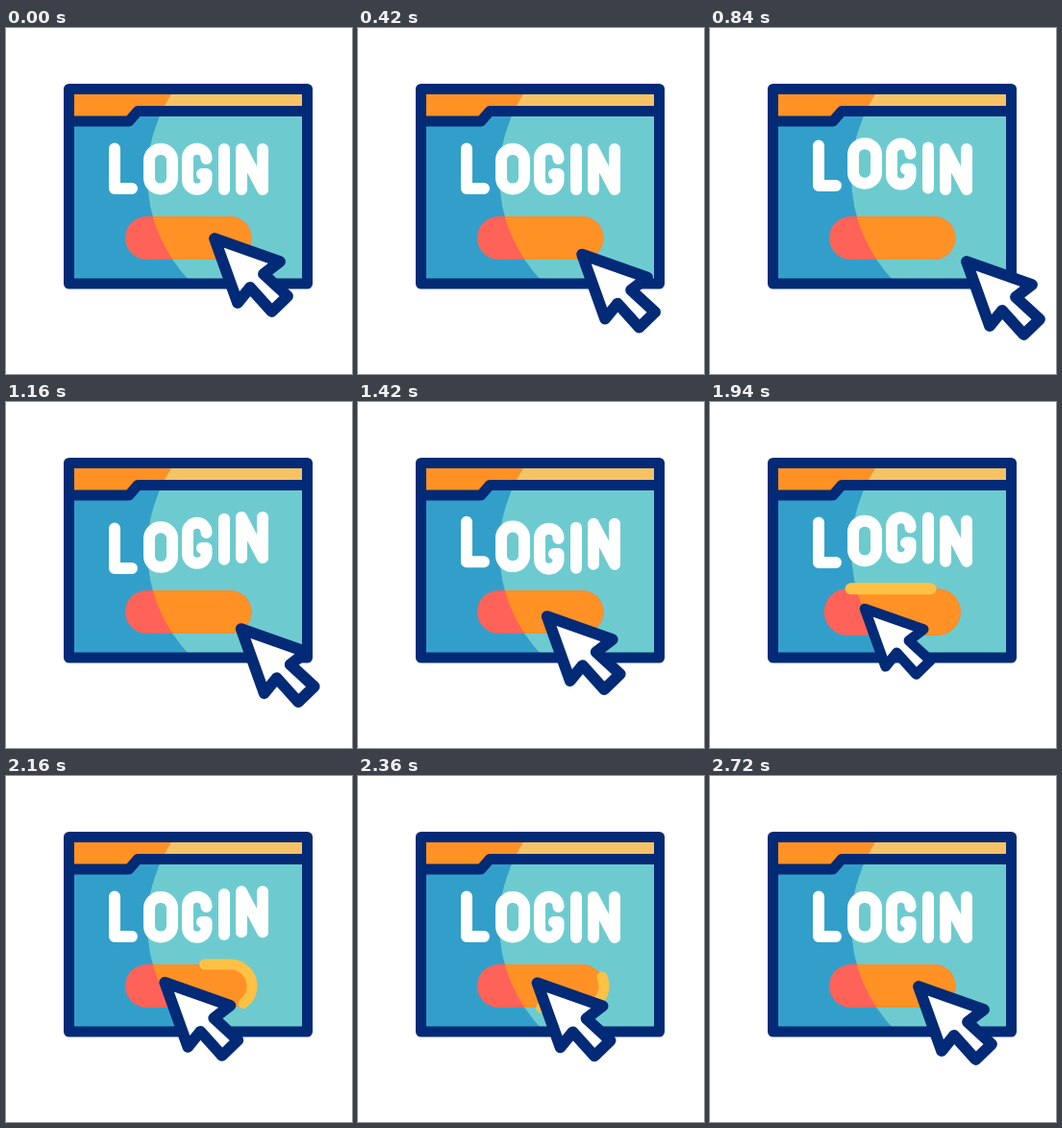
These frames come from a looping animation (360 by 360 pixels, 3 s). An HTML page:

```html
<!DOCTYPE html>
<html lang="en">
<head>
<meta charset="utf-8">
<title>Login</title>
<style>
  html, body { margin: 0; width: 100%; height: 100%; overflow: hidden; background: #fff; }
  svg { display: block; width: 100%; height: 100%; }
  .line { fill: none; stroke: #022a76; stroke-linecap: round; stroke-linejoin: round; }
  #word { fill: none; stroke: #fff; stroke-width: 12; stroke-linecap: round; stroke-linejoin: round; }
</style>
</head>
<body>
<svg viewBox="0 0 360 360" role="img" aria-label="LOGIN">
  <defs>
    <clipPath id="shine"><circle cx="304" cy="154" r="157"/></clipPath>
    <path id="tab" d="M66 64H313V86.500H137L128 97H66Z"/>
    <rect id="pill" x="124" y="196" width="131.5" height="45" rx="22.5"/>
  </defs>

  <rect x="66" y="64" width="247" height="202" fill="#329fca"/>
  <use href="#tab" fill="#ff9125"/>
  <g clip-path="url(#shine)">
    <rect x="66" y="64" width="247" height="202" fill="#6dcbd0"/>
    <use href="#tab" fill="#f6c364"/>
  </g>
  <path class="line" stroke-width="11" d="M66 97H128L137 86.500H313"/>
  <rect class="line" stroke-width="11" x="65.5" y="63.500" width="248" height="202.500"/>

  <g id="word">
    <path d="M113 125.500V167H131"/>
    <rect x="149" y="126" width="24" height="41.500" rx="11.5"/>
    <path d="M208.500 136V135.500A9.750 9.750 0 0 0 189 135.500V158A9.750 9.750 0 0 0 208.500 158V152H204"/>
    <path d="M227 126V168"/>
    <path d="M245 168V126L267 168V126"/>
  </g>

  <g>
    <use class="pulse" href="#pill" fill="#ff6259"/>
    <g clip-path="url(#shine)"><use class="pulse" href="#pill" fill="#ff9125"/></g>
    <g class="pulse">
      <path id="trace" fill="none" stroke="#ffc145" stroke-width="11" stroke-linecap="round"
        pathLength="315" d="M146.500 196H233.500A22.500 22.500 0 0 1 233.500 241H146.500A22.500 22.500 0 0 1 146.500 196"/>
    </g>
  </g>

  <path id="arrow" class="line" style="fill:#fff" stroke-width="11.8"
    d="M217 219L285 243L268 256L293 279L276.500 295L254 270L241 286Z"/>
</svg>
<script>
const LOOP = 3000;
const $ = s => document.querySelector(s);
const letters = [...$('#word').children];
const pulses = document.querySelectorAll('.pulse');
const trace = $('#trace'), arrow = $('#arrow');

const part = (t, a, b) => Math.min(1, Math.max(0, (t - a) / (b - a)));
const ease = u => (1 - Math.cos(Math.PI * u)) / 2;
const mix = (a, b, u) => a + (b - a) * u;
const bend = (a, c, b, u) => mix(mix(a, c, u), mix(c, b, u), u);

// Piecewise linear track of [time, value] steps
function track(steps, t) {
  let v = steps[0][1];
  for (let i = 1; i < steps.length; i++) {
    const [t0, v0] = steps[i - 1], [t1, v1] = steps[i];
    if (t >= t0) v = mix(v0, v1, part(t, t0, t1));
  }
  return v;
}

const HEAD = [[1840, 0], [1940, 80], [2360, 200], [2660, 315]];
const TAIL = [[1840, 0], [1940, 3], [2360, 112], [2660, 315]];

// Out to the right, across to the button, back to rest
function pointer(t) {
  if (t < 900) {
    const u = ease(part(t, 220, 760));
    return [bend(0, 27, 50, u), bend(0, 34, 24, u)];
  }
  if (t < 1840) {
    const u = ease(part(t, 900, 1760));
    return [mix(50, -56, u), bend(24, 7, -4, u)];
  }
  const u = ease(part(t, 2040, 2720));
  return [mix(-56, 0, u), bend(-4, -5, 0, u)];
}

// One and a half swings per letter, up first
function bob(t, i) {
  const swing = 1.5 * part(t, 440 + i * 120, 1880 + i * 120);
  return -6 * Math.sin(2 * Math.PI * swing);
}

function draw(t) {
  letters.forEach((el, i) => el.setAttribute('transform', `translate(0 ${bob(t, i)})`));

  const press = Math.sin(Math.PI * part(t, 1840, 2040));
  const grow = 1 + 0.08 * press;
  pulses.forEach(el => el.setAttribute('transform',
    `translate(190 218.5) scale(${grow}) translate(-190 -218.5)`));

  const head = track(HEAD, t), tail = track(TAIL, t), len = head - tail;
  trace.style.visibility = len > 0.5 ? 'visible' : 'hidden';
  trace.setAttribute('stroke-dasharray', `${len} 700`);
  trace.setAttribute('stroke-dashoffset', -tail);

  const [x, y] = pointer(t);
  arrow.setAttribute('transform',
    `translate(${217 + x} ${219 + y}) scale(${1 - 0.1 * press}) translate(-217 -219)`);
}

const start = performance.now();
function tick() {
  draw((performance.now() - start) % LOOP);
  requestAnimationFrame(tick);
}
tick();
</script>
</body>
</html>
```
